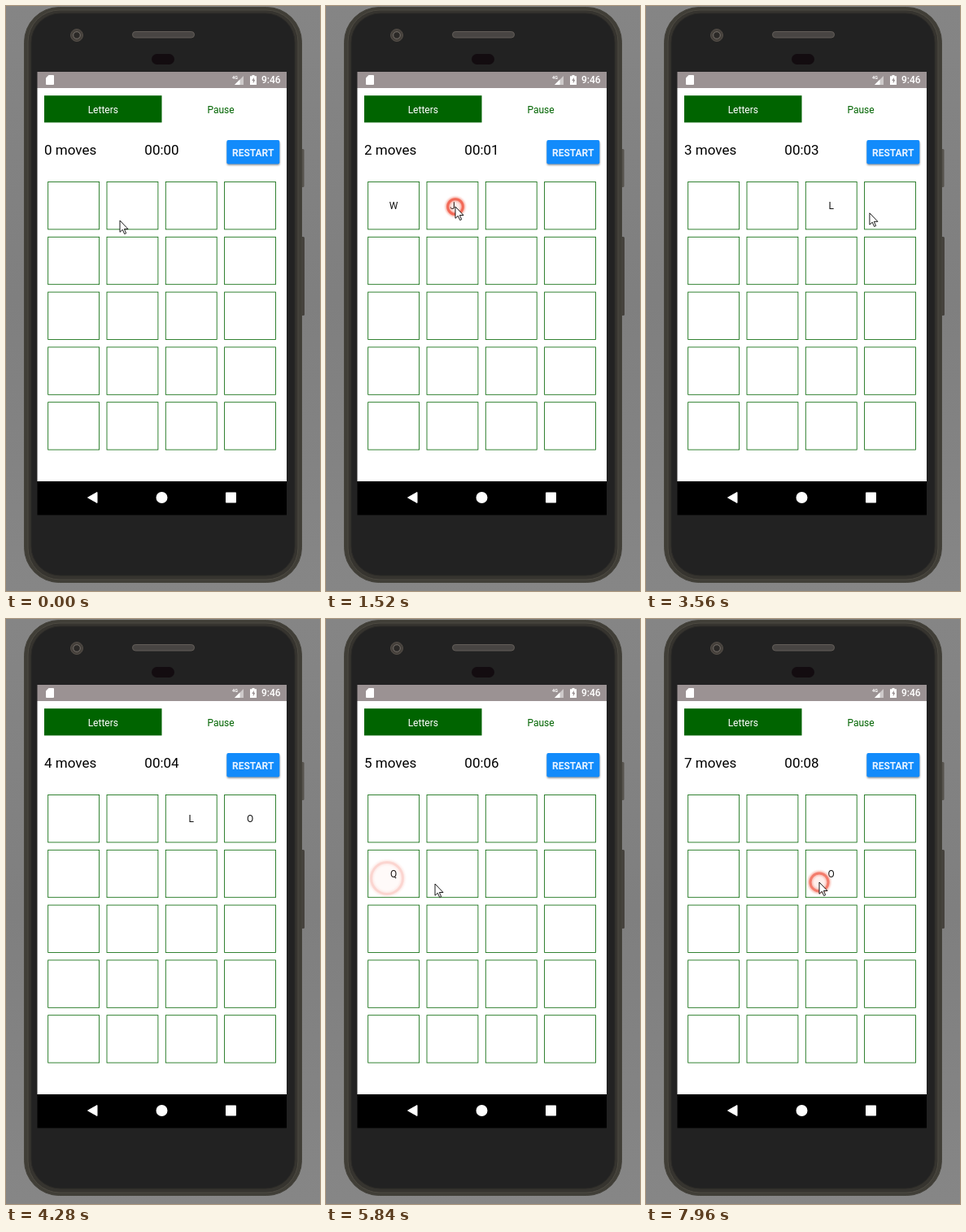
An HTML page that plays this animation: 386x720 px, repeating every 8000 ms.

```html
<!DOCTYPE html>
<html lang="en">
<head>
<meta charset="utf-8">
<title>Letter pairs</title>
<style>
  html, body { margin: 0; width: 100%; height: 100%; overflow: hidden; background: #848484; }
  svg { display: block; width: 386px; height: 720px; font-family: Roboto, sans-serif; }
  .mid { text-anchor: middle; }
  .small { font-size: 12px; }
  .big { font-size: 17px; }
</style>
</head>
<body>
<svg viewBox="0 0 386 720">
  <defs>
    <linearGradient id="wall" x1="0" y1="0" x2="0" y2="1">
      <stop offset="0" stop-color="#858585"/>
      <stop offset=".5" stop-color="#7f7f7f"/>
      <stop offset="1" stop-color="#868686"/>
    </linearGradient>
    <filter id="soft" x="-20%" y="-30%" width="140%" height="170%"><feGaussianBlur stdDeviation="1.1"/></filter>
    <filter id="glow" x="-50%" y="-50%" width="200%" height="200%"><feGaussianBlur stdDeviation="1"/></filter>
  </defs>

  <!-- phone body -->
  <rect width="386" height="720" fill="url(#wall)"/>
  <rect x="362" y="176" width="4.500" height="47" rx="1.500" fill="#56534d"/>
  <rect x="362" y="284" width="5" height="97" rx="1.500" fill="#45423d"/>
  <rect x="22.500" y="1.500" width="341" height="708" rx="43" fill="#403e37" stroke="#45433c"/>
  <rect x="27" y="5" width="332" height="701" rx="39" fill="#36342f" stroke="#4d4a42"/>
  <rect x="31" y="9" width="324" height="692" rx="36" fill="#222" stroke="#2b2a27"/>
  <circle cx="87" cy="36" r="7.500" fill="#45403b" stroke="#544e48"/>
  <circle cx="87" cy="36" r="4.300" fill="#2b2927" stroke="#77716b"/>
  <rect x="155.500" y="31.500" width="76" height="7.500" rx="3.700" fill="#484543" stroke="#625d58"/>
  <rect x="179" y="59" width="28" height="13" rx="6.500" fill="#130c10"/>

  <!-- screen -->
  <rect x="38.500" y="101" width="306.500" height="484" fill="#fff"/>
  <rect x="38.500" y="81" width="306.500" height="20" fill="#9b9293"/>
  <rect x="38.500" y="585" width="306.500" height="41.500" fill="#000"/>
  <g fill="#fff">
    <path d="M52.500 85H58a1 1 0 0 1 1 1V96a1 1 0 0 1-1 1H50a1 1 0 0 1-1-1V88.500z"/>
    <text x="278" y="90" font-size="5.500" font-weight="700">4G</text>
    <path d="M292 86V97H281z" opacity=".5"/>
    <path d="M287.500 90.500V97H281z"/>
    <path d="M302.500 85h3v1.300h2.500V97h-8V86.300h2.500z"/>
    <path d="M304.800 87.800l-2.500 4.200h1.500v3.200l2.600-4.400h-1.600z" fill="#9b9293"/>
    <text class="small" x="314" y="95.300" font-weight="500">9:46</text>
    <path d="M100.500 605L112 598.500V611.500z" stroke="#fff" stroke-linejoin="round"/>
    <circle cx="191.500" cy="605" r="7"/>
    <rect x="270" y="598.500" width="13" height="13" rx=".8"/>
  </g>

  <rect x="47" y="110.200" width="144.500" height="33.200" fill="#006400"/>
  <text class="small mid" x="119.300" y="132" fill="#fff">Letters</text>
  <text class="small mid" x="264" y="132" fill="#006400">Pause</text>
  <text class="big" id="moves" x="47" y="183"></text>
  <text class="big mid" id="clock" x="191.500" y="183"></text>
  <rect x="271.500" y="167" width="65" height="29" rx="2" opacity=".4" filter="url(#soft)"/>
  <rect x="271.300" y="165" width="65" height="29.500" rx="2" fill="#128bfb"/>
  <text class="small mid" x="303.700" y="184.800" font-weight="700" fill="#e8f3ff">RESTART</text>

  <g id="cells" fill="none" stroke="#006400" stroke-width=".8"></g>
  <g id="letters" class="small mid" fill="#151515"></g>
  <g id="ripple">
    <circle class="ring" fill="#ff6a50" fill-opacity=".15" stroke="#f6a294" stroke-width="6" filter="url(#glow)"/>
    <circle class="ring" fill="none" stroke="#f0503a" stroke-width="3"/>
  </g>
  <path id="cursor" d="M0 0V14.300L3.300 11.300 5.700 16.600 7.700 15.700 5.400 10.500H10z" fill="#fff" stroke="#000" stroke-width=".9"/>
</svg>
<script>
const LOOP = 8000, STEP = 40, RIPPLE = 360, HIDE_DELAY = 1180;
const TILE = { x: 51.7, y: 216.5, w: 62.9, h: 58.4, dx: 72.3, dy: 67.8 };
const $ = id => document.getElementById(id);
const rings = document.querySelectorAll(".ring");

// Cursor stops; those with a letter tap the next tile
const stops = [
  { t: 40, x: 140, y: 264 },
  { t: 440, x: 69, y: 266, letter: "W" },
  { t: 1460, x: 159, y: 247, letter: "J" },
  { t: 2620, x: 220, y: 272, letter: "L" },
  { t: 3780, x: 284, y: 252, letter: "O" },
  { t: 4220, x: -20, y: 392 },
  { t: 4600, x: -20, y: 300 },
  { t: 5100, x: 75, y: 319 },
  { t: 5540, x: 75, y: 319, letter: "Q" },
  { t: 5800, x: 134, y: 326 },
  { t: 6180, x: 137, y: 322, letter: "B" },
  { t: 6680, x: 165, y: 361 },
  { t: 7000, x: 195, y: 326 },
  { t: 7860, x: 213, y: 324, letter: "O" }
];
const taps = stops.filter(s => s.letter);

function add(parent, tag, attrs) {
  const el = document.createElementNS("http://www.w3.org/2000/svg", tag);
  for (const key in attrs) el.setAttribute(key, attrs[key]);
  return parent.appendChild(el);
}

function tile(i) {
  return { x: TILE.x + TILE.dx * (i % 4), y: TILE.y + TILE.dy * Math.floor(i / 4) };
}

for (let i = 0; i < 20; i++) {
  add($("cells"), "rect", { ...tile(i), width: TILE.w, height: TILE.h });
}
taps.forEach((tap, i) => {
  const { x, y } = tile(i);
  tap.el = add($("letters"), "text", { x: x + TILE.w / 2, y: y + 33.8 });
  tap.el.textContent = tap.letter;
  // A pair turns back together, some time after its second tap
  const second = taps[i | 1];
  tap.hide = second ? second.t + HIDE_DELAY : LOOP;
});

// Rest for a fifth of the gap, then ease to the next stop
function cursorAt(t) {
  const next = stops.findIndex(s => s.t > t);
  if (next === 0) return stops[0];
  if (next < 0) return stops[stops.length - 1];
  const a = stops[next - 1], b = stops[next];
  const k = Math.max(0, ((t - a.t) / (b.t - a.t) - .2) / .8);
  const e = k * k * (3 - 2 * k);
  return { x: a.x + (b.x - a.x) * e, y: a.y + (b.y - a.y) * e };
}

function draw(t) {
  const done = taps.filter(tap => tap.t <= t);
  $("moves").textContent = done.length + (done.length === 1 ? " move" : " moves");
  $("clock").textContent = "00:0" + Math.max(0, Math.floor((t - 380) / 910));
  for (const tap of taps) {
    tap.el.style.display = t >= tap.t && t < tap.hide ? "" : "none";
  }

  const last = done[done.length - 1];
  const age = last ? t - last.t : RIPPLE;
  $("ripple").style.display = age < RIPPLE ? "" : "none";
  if (age < RIPPLE) {
    for (const ring of rings) {
      ring.setAttribute("cx", last.x);
      ring.setAttribute("cy", last.y);
      ring.setAttribute("r", 6.8 + .042 * age);
    }
    $("ripple").setAttribute("opacity", 1 - age / 390);
  }

  const { x, y } = cursorAt(t);
  $("cursor").setAttribute("transform", `translate(${x} ${y})`);
}

const start = performance.now();
function frame() {
  const t = (performance.now() - start) % LOOP;
  draw(Math.floor(t / STEP) * STEP);
  requestAnimationFrame(frame);
}
frame();
</script>
</body>
</html>
```
